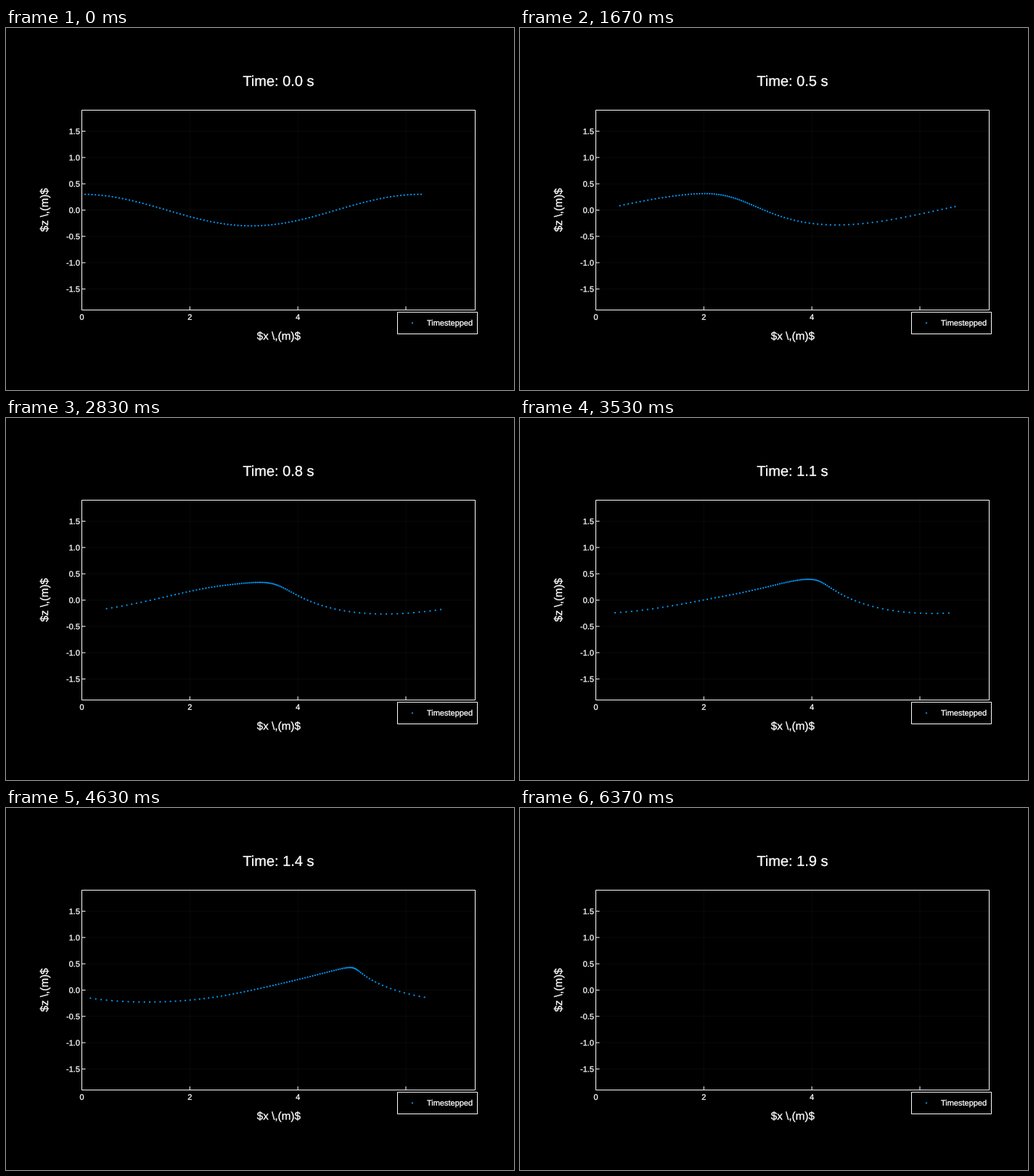
These frames come from a looping animation (700 by 500 pixels, 6.53 s). A matplotlib script:

```python
import numpy as np
import matplotlib.pyplot as plt
from matplotlib.animation import FuncAnimation
from matplotlib.collections import LineCollection
from matplotlib.patches import PathPatch, Rectangle
from matplotlib.textpath import TextPath
from matplotlib.transforms import Affine2D

W, H, DPI = 700, 500, 100
PX = 72 / DPI                       # one pixel in points
LEFT, RIGHT, TOP, BOTTOM = 104.5, 646.5, 113.5, 389.5
BLUE = "#009afa"

# Deep-water wave: surface particles stepped with a Cauchy boundary integral
N, G, AMP = 100, 9.81, 0.3
DT, SUB, LAST = 0.01, 2, 191
s = 2 * np.pi * np.arange(1, N + 1) / N
k = np.fft.fftfreq(N, 1 / N)
ik = 1j * np.where(np.abs(k) < N / 2, k, 0)
damp = np.exp(-36 * np.abs(2 * k / N) ** 16)


def spectral(f, mult):
    return np.fft.ifft(mult * np.fft.fft(f))


def rates(z, phi):
    """Particle velocity and rate of change of the potential."""
    dz = 1 + spectral(z - s, ik)
    zeta = np.exp(-1j * z)
    gap = zeta[None, :] - zeta[:, None]
    np.fill_diagonal(gap, 1)
    kern = (-1j * dz * zeta)[None, :] / gap
    np.fill_diagonal(kern, 0)
    kern -= np.diag(kern.sum(axis=1))
    rhs = kern.real @ phi + spectral(phi, ik).real
    psi = np.linalg.solve(kern.imag + 0.5, rhs)
    vel = np.conj(spectral(phi + 1j * psi, ik) / dz)
    return vel, 0.5 * np.abs(vel) ** 2 - G * z.imag


def rk4(z, phi, h):
    a = rates(z, phi)
    b = rates(z + h / 2 * a[0], phi + h / 2 * a[1])
    c = rates(z + h / 2 * b[0], phi + h / 2 * b[1])
    d = rates(z + h * c[0], phi + h * c[1])
    mix = [(p + 2 * q + 2 * r + t) * h / 6 for p, q, r, t in zip(a, b, c, d)]
    return z + mix[0], phi + mix[1]


def simulate():
    z = s + 1j * AMP * np.cos(s)
    phi = AMP * np.sqrt(G) * np.sin(s)
    poses = [z]
    for _ in range(LAST - 1):
        for _ in range(SUB):
            z, phi = rk4(z, phi, DT / SUB)
        z = s + spectral(z - s, damp)
        phi = spectral(phi, damp).real
        if not np.isfinite(z).all():
            break
        poses.append(z)
    return poses


def px(x):
    return LEFT + x * (RIGHT - LEFT) / (2 * np.pi + 1)


def py(y):
    return (TOP + BOTTOM) / 2 - y * (BOTTOM - TOP) / 3.8


poses = simulate()

fig = plt.figure(figsize=(W / DPI, H / DPI), dpi=DPI, facecolor="black")
ax = fig.add_axes([0, 0, 1, 1])
ax.set(xlim=(0, W), ylim=(H, 0))
ax.axis("off")


def outline(x, y, text, size, align=0.5, turn=0):
    """Glyph outlines; align 0, 0.5 or 1 puts x at the left, middle or right."""
    path = TextPath((0, 0), text.replace("$", r"\$"), size=size,
                    prop={"family": "Liberation Sans"})
    ink = path.get_extents()
    shift = -(ink.x0 + align * ink.width)
    move = Affine2D().translate(shift, 0).rotate_deg(turn).scale(1, -1)
    return path.transformed(move.translate(x, y))


def label(*args, **kw):
    return ax.add_patch(PathPatch(outline(*args, **kw), facecolor="white",
                                  edgecolor="white", linewidth=0.3 * PX,
                                  snap=False, zorder=7))


def box(x0, y0, x1, y1, z):
    ax.add_patch(Rectangle((x0, y0), x1 - x0, y1 - y0, facecolor="black",
                           edgecolor="white", linewidth=PX, snap=False,
                           zorder=z))


def lines(segments, color, z):
    ax.add_collection(LineCollection(segments, colors=[color], linewidths=PX,
                                     snap=False, zorder=z))


def dots(x, y, z):
    size = np.full(np.size(x), (2.2 * PX) ** 2)
    return ax.scatter(x, y, s=size, c=BLUE, edgecolors="none", snap=False,
                      zorder=z)


box(LEFT, TOP, RIGHT, BOTTOM, 1)
grid, ticks = [], []
for v in (2, 4, 6):
    x = px(v)
    grid.append([(x, TOP + 1), (x, BOTTOM - 1)])
    ticks.append([(x, BOTTOM), (x, BOTTOM - 5)])
for v in np.arange(-1.5, 1.6, 0.5):
    y = py(v)
    grid.append([(LEFT + 1, y), (RIGHT - 1, y)])
    ticks.append([(LEFT, y), (LEFT + 5, y)])
    label(101.5, y + 4, f"{v:.1f}", 11, align=1)
lines(grid, (1, 1, 1, 0.045), 2)
lines(ticks, "white", 3)
for v in (0, 2, 4):
    label(px(v), 403, str(v), 11)

label(375.8, 430.5, r"$x \,(m)$", 15.28)
label(58, 251.5, r"$z \,(m)$", 15.28, turn=90)
titles = [outline(375.3, 80, f"Time: {i / 10:.1f} s", 20) for i in range(20)]
title = label(375.3, 80, "Time: 0.0 s", 20)

box(539.5, 392.5, 649.5, 422.5, 5)
dots([560], [407.5], 6)
label(580.2, 411, "Timestepped", 11, align=0)

wave = dots(px(s), py(AMP * np.cos(s)), 4)


def draw(tick):
    # 30 steps a second on a 10 ms clock, then a pause on the empty plot
    n = min(int((tick + 0.5) * 0.3), LAST)
    title.set_path(titles[round(n / 10)])
    wave.set_visible(n < LAST)
    z = poses[min(n, len(poses) - 1)]
    wave.set_offsets(np.column_stack([px(z.real), py(z.imag)]))
    return title, wave


anim = FuncAnimation(fig, draw, frames=653, interval=10, repeat=True,
                     repeat_delay=0, init_func=lambda: draw(0))
plt.show()
```
